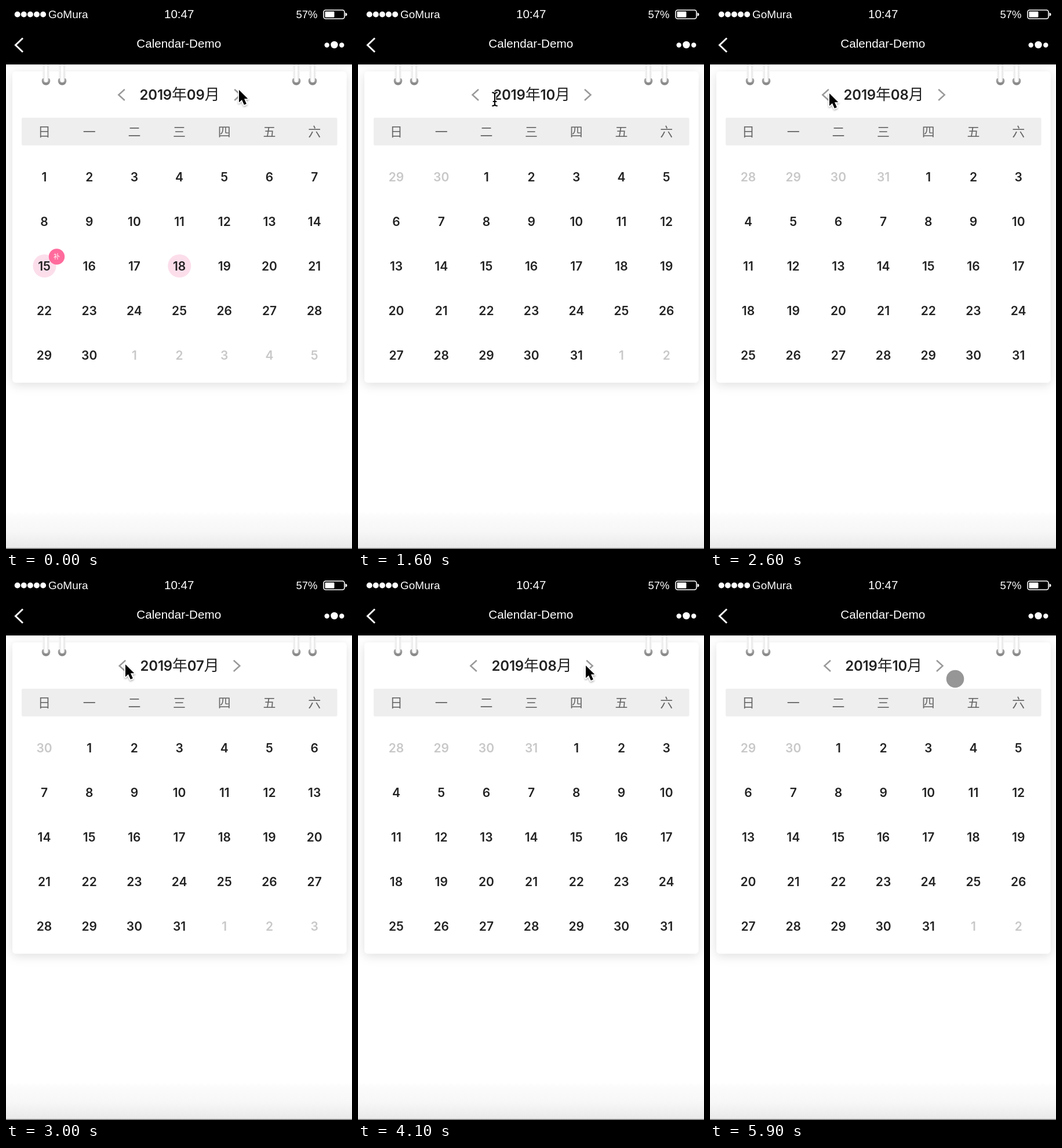
These frames come from a looping animation (597x938 px, 6000 ms). An HTML page:

```html
<!DOCTYPE html>
<html lang="zh-CN">
<head>
<meta charset="utf-8">
<title>Calendar</title>
<style>
  html, body { margin: 0; width: 100%; height: 100%; overflow: hidden; background: #fff; }
  svg { display: block; width: 100%; height: 100%; }
  text { font-family: "Liberation Sans", Arial, sans-serif; }
  .bar text { fill: #fff; }
  .month { font: 600 24px Inter, "Noto Sans CJK SC", sans-serif; fill: #222; letter-spacing: -.2px; }
  .month tspan { font-family: "Noto Sans CJK SC", "Noto Sans CJK", sans-serif; font-size: 26px; font-weight: 500; }
  .week { font: 22px "Noto Sans CJK SC", "Noto Sans CJK", sans-serif; fill: #666; }
  .day { font: 600 21px Inter, sans-serif; fill: #222; }
  .other { fill: #c8c8c8; }
  .tag { font: 11px "Noto Sans CJK SC", "Noto Sans CJK", sans-serif; fill: #fff; }
  .mid { text-anchor: middle; }
  .chevron { fill: none; stroke: #999; stroke-width: 2.5; }
</style>
</head>
<body>
<svg viewBox="0 0 597 938" preserveAspectRatio="none">
  <defs>
    <linearGradient id="foot" x2="0" y2="1">
      <stop offset="0" stop-color="#fff"/>
      <stop offset=".15" stop-color="#fbfbfb"/>
      <stop offset=".55" stop-color="#f7f7f7"/>
      <stop offset="1" stop-color="#e9e9e9"/>
    </linearGradient>
    <linearGradient id="post">
      <stop offset="0" stop-color="#e4e4e4"/>
      <stop offset=".35" stop-color="#fff"/>
      <stop offset=".65" stop-color="#fff"/>
      <stop offset="1" stop-color="#dedede"/>
    </linearGradient>
    <linearGradient id="hole" x2="0" y2="1">
      <stop offset="0" stop-color="#b5b5b5"/>
      <stop offset="1" stop-color="#808080"/>
    </linearGradient>
    <filter id="cardShade" x="-10%" y="-10%" width="120%" height="120%">
      <feDropShadow dx="0" dy="4" stdDeviation="9" flood-opacity=".13"/>
    </filter>
    <filter id="pointerShade" x="-50%" y="-50%" width="200%" height="200%">
      <feDropShadow dx="0" dy="2" stdDeviation="1.5" flood-opacity=".3"/>
    </filter>
  </defs>

  <rect width="597" height="938" fill="#fff"/>
  <rect y="873" width="597" height="64" fill="url(#foot)"/>
  <rect y="936.5" width="597" height="1.5" fill="#707070"/>

  <rect x="11" y="113" width="576.5" height="537.5" rx="6" fill="#fff" filter="url(#cardShade)"/>
  <g id="rings"></g>

  <g class="bar">
    <rect width="597" height="101"/>
    <g id="signal" fill="#fff"></g>
    <text x="73" y="21" font-size="19">GoMura</text>
    <text class="mid" x="298.7" y="21" font-size="20.6">10:47</text>
    <text x="500.5" y="21" font-size="18.5">57%</text>
    <rect x="548" y="7" width="36" height="15" rx="3.5" fill="none" stroke="#fff" stroke-width="1.6"/>
    <rect x="550.5" y="9.5" width="16" height="10" rx="1" fill="#fff"/>
    <path d="M585.5 11.5q3 .5 3 3t-3 3z" fill="#fff"/>
    <path d="M29 55.5L16.5 67.5L29 79.5" fill="none" stroke="#fff" stroke-width="3"/>
    <text class="mid" x="298.3" y="72" font-size="20.7">Calendar-Demo</text>
    <g fill="#fff">
      <circle cx="553.7" cy="67.5" r="4.2"/>
      <circle cx="566.5" cy="67" r="6.2"/>
      <circle cx="579.3" cy="67.5" r="4.2"/>
    </g>
  </g>

  <path class="chevron" id="prev" d="M5.5 -9.5L-5 0L5.5 9.5"/>
  <path class="chevron" id="next" d="M-5.5 -9.5L5 0L-5.5 9.5"/>
  <text class="month mid" x="299.5" y="162">2019<tspan>年</tspan><tspan id="number" style="font:inherit"></tspan><tspan>月</tspan></text>

  <rect x="27" y="193" width="544.5" height="47.7" rx="2" fill="#eee"/>
  <g id="week"></g>

  <g id="marks">
    <circle cx="66.5" cy="449" r="20" fill="#fcdeeb"/>
    <circle cx="299.3" cy="449" r="20" fill="#fcdeeb"/>
  </g>
  <g id="days"></g>
  <g id="badge">
    <circle cx="87.5" cy="433" r="13.7" fill="#ff6b9c"/>
    <text class="tag mid" x="87.5" y="437">补</text>
  </g>

  <g id="arrow" filter="url(#pointerShade)">
    <path d="M0 0V21.5L5 16.9L8.8 25.8L12.9 24L9 15.3H15.3Z" stroke="#fff" stroke-width="3.4" stroke-linejoin="round" paint-order="stroke"/>
  </g>
  <g id="beam" fill="none" stroke-linecap="round">
    <path id="stem" d="M-4 -11.5Q0 -11.5 0 -8V8Q0 11.5 -4 11.5M4 -11.5Q0 -11.5 0 -8M0 8Q0 11.5 4 11.5M-2.5 4H2.5" stroke="#fff" stroke-width="4.5"/>
    <use href="#stem" id="ink"/>
    <path d="M-4 -11.5Q0 -11.5 0 -8V8Q0 11.5 -4 11.5M4 -11.5Q0 -11.5 0 -8M0 8Q0 11.5 4 11.5M-2.5 4H2.5" stroke="#000" stroke-width="2"/>
  </g>
  <circle id="touch" r="15.3" fill="#969696"/>
</svg>

<script>
const LOOP = 6000, STEP = 100, YEAR = 2019;
const $ = id => document.getElementById(id);

// [start time, month]
const months = [[0, 9], [1200, 10], [2000, 9], [2500, 8], [2900, 7], [3900, 8], [4200, 9], [5700, 10]];

// [time, x, y] of the pointer hotspot
const path = [
  [0, 402, 145], [700, 399, 150], [1200, 399, 150], [1600, 236, 161], [1800, 207, 152],
  [2600, 206, 151], [3000, 206, 151], [3600, 390, 155], [4100, 393, 153], [4400, 393, 153],
  [5000, 440, 708], [5399, 440, 708], [5400, 404, 164], [5700, 404, 164], [5900, 423, 176], [6000, 423, 176]
];

const colX = i => 66 + i * 77.7;
const rowY = i => 302.5 + i * 77.1;

function label(cls, x, y, value) {
  return `<text class="${cls} mid" x="${x}" y="${y}">${value}</text>`;
}

function drawFixed() {
  $('signal').innerHTML = [0, 1, 2, 3, 4]
    .map(i => `<circle cx="${19.7 + i * 11.1}" cy="14.5" r="5"/>`).join('');
  $('week').innerHTML = [...'日一二三四五六']
    .map((d, i) => label('week', colX(i), 225, d)).join('');
  $('rings').innerHTML = [69, 97, 501, 529].map(x =>
    `<circle cx="${x}" cy="129.5" r="7.3" fill="url(#hole)"/>
     <path d="M${x - 6} 101h12v24h-12z" fill="#f3f3f3"/>
     <path d="M${x - 4} 101h8v27a4 4 0 0 1 -8 0z" fill="url(#post)"/>`).join('');
}

let shown = 0;
function drawMonth(month) {
  if (month === shown) return;
  shown = month;
  $('number').textContent = String(month).padStart(2, '0');
  const half = { 7: 98.8, 10: 97 }[month] || 100.2;
  $('prev').setAttribute('transform', `translate(${299.5 - half} 153.5)`);
  $('next').setAttribute('transform', `translate(${299.5 + half} 153.5)`);

  const lead = new Date(YEAR, month - 1, 1).getDay();
  let cells = '';
  for (let i = 0; i < 35; i++) {
    const date = new Date(YEAR, month - 1, i - lead + 1);
    const cls = date.getMonth() === month - 1 ? 'day' : 'day other';
    cells += label(cls, colX(i % 7), rowY(Math.floor(i / 7)), date.getDate());
  }
  $('days').innerHTML = cells;
  show('marks', month === 9);
  show('badge', month === 9);
}

function show(id, on) {
  $(id).style.display = on ? '' : 'none';
}

function pointerAt(t) {
  const i = path.findIndex(p => p[0] > t);
  const [t0, x0, y0] = path[i - 1], [t1, x1, y1] = path[i];
  const u = (t - t0) / (t1 - t0), e = u * u * (3 - 2 * u);
  return [x0 + (x1 - x0) * e, y0 + (y1 - y0) * e];
}

function drawPointer(t) {
  const [x, y] = pointerAt(t);
  const away = t > 5000 && t < 5400;
  const touch = t >= 5400;
  const overText = x > 232 && x < 367 && y > 135 && y < 172;
  const kind = away ? '' : touch ? 'touch' : overText ? 'beam' : 'arrow';
  for (const id of ['arrow', 'beam', 'touch']) {
    show(id, id === kind);
    $(id).setAttribute('transform', `translate(${x} ${y})`);
  }
}

function render(now) {
  const t = Math.floor((now % LOOP) / STEP) * STEP;
  drawMonth(months.filter(m => m[0] <= t).pop()[1]);
  drawPointer(t);
}

$('ink').remove();
drawFixed();
const start = performance.now();
function tick() {
  render(performance.now() - start);
  requestAnimationFrame(tick);
}
tick();
</script>
</body>
</html>
```
